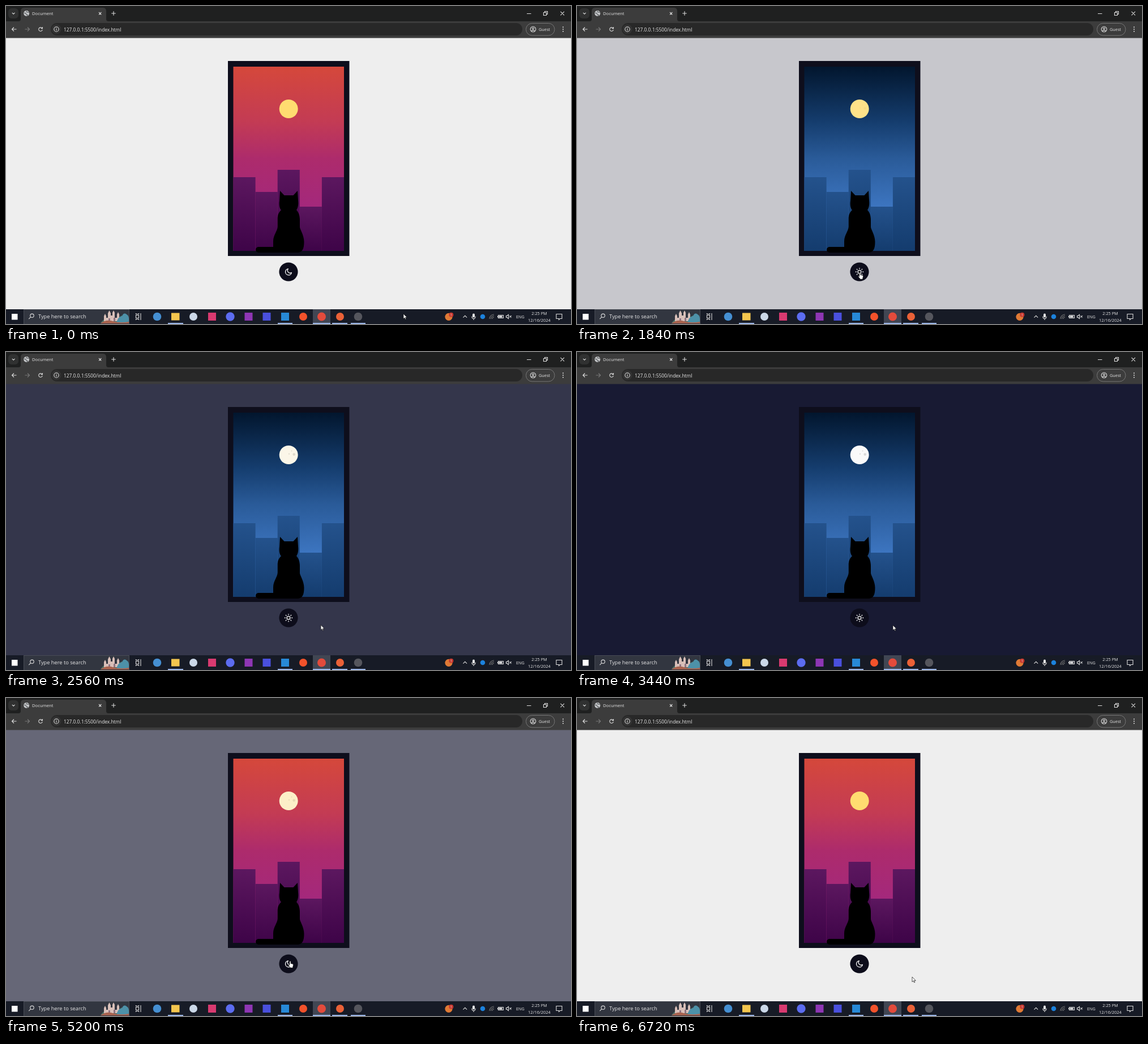
Animation of 998 by 561 pixels, one loop 6.8 s. Source, as an HTML page:

```html
<!DOCTYPE html>
<html lang="en">
<head>
<meta charset="utf-8">
<title>Day and night window</title>
<style>
  html, body { margin: 0; width: 100%; height: 100%; overflow: hidden; background: #eee; }
  svg { display: block; width: 100%; height: 100%; }
  text { font-family: "Open Sans", "Noto Sans", sans-serif; fill: #e6e6e6; }
  .line { fill: none; stroke: #dcdcdc; stroke-width: 1.1; }
  .dim { stroke: #777; }

  /* Colours fade after each click; the sky and icons switch at once. */
  .page, .disc, .crater { animation: 6.8s ease infinite; }
  .page { animation-name: page; }
  .disc { animation-name: disc; }
  .crater { animation-name: crater; }
  @keyframes page {
    0%, 23.38% { fill: #eee; }
    48.09%, 70.81% { fill: #181a33; }
    95.51%, 100% { fill: #eee; }
  }
  @keyframes disc {
    0%, 23.38% { fill: #ffdc70; }
    48.09%, 70.81% { fill: #fafafa; }
    95.51%, 100% { fill: #ffdc70; }
  }
  @keyframes crater {
    0%, 23.38% { fill: #ffdc70; }
    48.09%, 70.81% { fill: #d9d9d9; }
    95.51%, 100% { fill: #ffdc70; }
  }

  .day, .night, .arrow, .hand { animation: 6.8s step-end infinite; }
  .day { animation-name: day; }
  .night { animation-name: night; }
  .arrow { animation-name: arrow; }
  .hand { animation-name: hand; }
  @keyframes day { 0%, 70.81% { opacity: 1; } 23.38% { opacity: 0; } }
  @keyframes night { 0%, 70.81% { opacity: 0; } 23.38% { opacity: 1; } }
  @keyframes arrow { 0%, 32.5%, 80.1% { opacity: 1; } 12.9%, 58.5% { opacity: 0; } }
  @keyframes hand { 0%, 32.5%, 80.1% { opacity: 0; } 12.9%, 58.5% { opacity: 1; } }

  .cursor { animation: travel 6.8s ease-out infinite; }
  @keyframes travel {
    0%, 1.2% { transform: translate(702px, 543px); }
    10.6% { transform: translate(550px, 491px); }
    16.5%, 30.6% { transform: translate(500px, 470px); }
    31.76% { transform: translate(511px, 471px); }
    38.8%, 52.9% { transform: translate(558px, 482px); }
    63.2%, 77.6% { transform: translate(502px, 464px); }
    88.2%, 100% { transform: translate(592px, 492px); }
  }
</style>
</head>
<body>
<svg viewBox="0 0 998 561" preserveAspectRatio="none">
  <defs>
    <linearGradient id="daySky" x2="0" y2="1">
      <stop stop-color="#d5483b"/><stop offset=".3" stop-color="#c33b54"/>
      <stop offset=".5" stop-color="#ad2b6c"/><stop offset=".78" stop-color="#a3287d"/>
    </linearGradient>
    <linearGradient id="nightSky" x2="0" y2="1">
      <stop stop-color="#02162e"/><stop offset=".3" stop-color="#153d6e"/>
      <stop offset=".5" stop-color="#2a5b99"/><stop offset=".78" stop-color="#3e77c3"/>
    </linearGradient>
    <linearGradient id="dayTower" x2="0" y2="1">
      <stop stop-color="#5c175f"/><stop offset="1" stop-color="#3e0448"/>
    </linearGradient>
    <linearGradient id="nightTower" x2="0" y2="1">
      <stop stop-color="#24528c"/><stop offset="1" stop-color="#143c6e"/>
    </linearGradient>
    <rect id="sky" x="401.5" y="107" width="195.5" height="325"/>
    <g id="towers">
      <rect x="401.5" y="302" width="39.1" height="130"/>
      <rect x="440.6" y="328" width="39.1" height="104"/>
      <rect x="479.7" y="289" width="39.1" height="143"/>
      <rect x="518.8" y="354" width="39.1" height="78"/>
      <rect x="557.9" y="302" width="39.1" height="130"/>
    </g>
  </defs>

  <rect class="page" y="56" width="998" height="480" fill="#eee"/>

  <!-- Browser bars -->
  <rect width="998" height="28" fill="#1f2020"/>
  <rect y="27" width="998" height="29.5" fill="#3c3c3c"/>
  <path d="M22 27q4 0 4-4V9q0-6 6-6H171q6 0 6 6v14q0 4 4 4z" fill="#3c3c3c"/>
  <rect x="4" y="4" width="18" height="18" rx="6" fill="#303131"/>
  <path class="line" d="M10.8 11.8l2.4 2.4 2.4-2.4"/>
  <circle cx="36.2" cy="13" r="5" fill="#c4c6c8"/>
  <path d="M32 12.5q3-.5 3.500 1.500t2 1.500-.5 2.200M36 8.500q-.5 2 1.500 2.200t3 1" fill="none" stroke="#55585b" stroke-width="1.200"/>
  <text x="46" y="16" font-size="7.7">Document</text>
  <path class="line" d="M164 11l4.400 4.400M168.400 11l-4.400 4.400M186.200 13h7.600M190 9.200v7.600"/>
  <path class="line" d="M920 13.500h7.500M949.500 11.500h5v5h-5zM951.500 11.500v-2h5v5h-2M979.500 9.800l6.500 6.500M986 9.800l-6.500 6.500"/>
  <path class="line" d="M18.500 41h-8M14 37.500L10.500 41l3.500 3.500"/>
  <path class="line dim" d="M33.500 41h8M38 37.500l3.500 3.500-3.500 3.500"/>
  <path class="line" d="M63.800 39.300a3.300 3.300 0 1 0 .5 2.500M64.400 37v2.700h-2.700"/>
  <rect x="79" y="30" width="833" height="22" rx="11" fill="#282828"/>
  <circle cx="89" cy="41" r="8.500" fill="#333"/>
  <circle class="line" cx="89" cy="41" r="4.200"/>
  <path class="line" d="M89 40.300v3M89 38.500v1"/>
  <text x="102" y="44.500" font-size="8.400">127.0.0.1:5500/index.html</text>
  <rect x="918.500" y="30.500" width="50.500" height="21.500" rx="10.700" fill="none" stroke="#777"/>
  <circle class="line" cx="931" cy="41" r="4.800"/>
  <circle class="line" cx="931" cy="39.700" r="1.500"/>
  <path class="line" d="M927.800 44.200q3.200-2.600 6.400 0"/>
  <text x="941" y="43.800" font-size="7.300">Guest</text>
  <g fill="#dcdcdc">
    <circle cx="984" cy="37.300" r="1"/><circle cx="984" cy="41" r="1"/><circle cx="984" cy="44.700" r="1"/>
  </g>

  <!-- Window picture -->
  <rect x="392" y="97" width="214.500" height="344" fill="#0e0e1c"/>
  <g class="day">
    <use href="#sky" fill="url(#daySky)"/>
    <use href="#towers" fill="url(#dayTower)"/>
  </g>
  <g class="night" opacity="0">
    <use href="#sky" fill="url(#nightSky)"/>
    <use href="#towers" fill="url(#nightTower)"/>
  </g>
  <circle class="disc" cx="499.200" cy="181.500" r="16.500"/>
  <g class="crater">
    <circle cx="508.700" cy="180.600" r="2.300"/>
    <circle cx="500" cy="179.800" r="1.100"/>
    <circle cx="504.500" cy="174.500" r=".9"/>
  </g>
  <path d="M484 326L491.500 334H507.500L515 326L516 343C517 352 515 357 513 360C517 364 519 370 519 378V390C519 394 526.500 404 526.500 416C526.500 428 524 435 514 435H446a5 5 0 0 1 0-10H472V415C472 404 479.700 397 479.700 389V376C479.700 368 482 364 486 360C483 357 482 350 483 344Z"/>

  <!-- Theme button -->
  <circle cx="499" cy="469" r="16.600" fill="#0d0d1b"/>
  <path class="day" d="M498.400 463.700A5.500 5.500 0 1 0 504.400 470.300A4.500 4.500 0 0 1 498.400 463.700Z" fill="none" stroke="#fff" stroke-width="1.300" stroke-linejoin="round"/>
  <g class="night" opacity="0" fill="none" stroke="#fff" stroke-width="1.300" stroke-linecap="round">
    <circle cx="499" cy="469" r="2.900"/>
    <path d="M499 462.300v1M499 474.700v1M492.300 469h1M504.700 469h1M494.300 464.300l.7.700M503 473l.7.700M494.300 473.700l.7-.7M503 465l.7-.7"/>
  </g>

  <!-- Taskbar -->
  <rect y="535" width="998" height="26" fill="#171b26"/>
  <rect x="10" y="543" width="10.500" height="10.500" fill="#fff"/>
  <rect x="31.500" y="535.500" width="186" height="26" fill="#323640" stroke="#484c55"/>
  <circle class="line" cx="46" cy="546.300" r="3.200"/>
  <path class="line" d="M43.700 548.700l-3.500 3.500"/>
  <text x="57" y="551.300" font-size="9.250">Type here to search</text>

  <!-- Search box picture -->
  <path d="M167 560q6-11 15-7t18-4 17 4v7z" fill="#4f7468"/>
  <path d="M173 556v-9l2-4 2 4v3h3v-8l2.500-5 2.500 5v4h3v-5l2-4 2 4v9h4v-6l2-4 2 4v12z" fill="#d8bfb8"/>
  <path d="M181 556v-5h3v5zM190 556v-6h3v6z" fill="#8f7482"/>
  <path d="M195 560q2-12 10-13 3-7 8-3 4 2 4 8v8z" fill="#4d91a8"/>
  <path d="M167 560q10-8 22-4t28 1v3z" fill="#a9634f"/>

  <path class="line" d="M229.500 545.500h5v5h-5zM229.500 542v1.500h5V542M229.500 554v-1.500h5V554M238 542v12"/>
  <rect x="542" y="535" width="31" height="26" fill="#414653"/>
  <circle cx="267" cy="548" r="7.300" fill="#458fd2"/>
  <rect x="292" y="541.500" width="14.500" height="13" fill="#f4c64e"/>
  <circle cx="331" cy="548" r="7" fill="#cbd8e8"/>
  <rect x="357" y="541" width="14" height="14" fill="#d83a70"/>
  <circle cx="396" cy="548" r="7.700" fill="#5c6cf0"/>
  <rect x="421.500" y="541" width="14" height="14" fill="#8e36b4"/>
  <rect x="453.500" y="541" width="14" height="14" fill="#4a50dd"/>
  <rect x="486" y="541" width="14" height="14" fill="#2789d6"/>
  <circle cx="525" cy="548" r="7" fill="#f2522b"/>
  <circle cx="557.500" cy="548" r="7.500" fill="#e34b3c"/>
  <circle cx="590" cy="548" r="7" fill="#ea6137"/>
  <circle cx="622" cy="548" r="7.300" fill="#55565d"/>
  <path d="M286 560h27M480 560h26M542 560h31M576 560h27M609 560h26" stroke="#9db8ea" stroke-width="2"/>

  <!-- Tray -->
  <circle cx="782" cy="548.300" r="6.600" fill="#e07a35"/>
  <circle cx="786.300" cy="544.800" r="4" fill="#c93a32"/>
  <text x="784.800" y="547" font-size="6">1</text>
  <path class="line" d="M807.500 549.700l3.300-3.400 3.300 3.400"/>
  <rect x="824" y="542.500" width="4" height="7" rx="2" fill="#eee"/>
  <path class="line" d="M822.800 547.500q0 4 3.200 4t3.200-4M826 551.500v2.500"/>
  <circle cx="842" cy="548" r="4.300" fill="#1c82dd"/>
  <path class="line dim" d="M854 552a8 8 0 0 1 8-8M856.500 552a5.500 5.500 0 0 1 5.500-5.500M859 552a3 3 0 0 1 3-3"/>
  <path class="line" d="M869.500 545.500h9v5h-9z"/>
  <path d="M870.500 546.500h6v3h-6zM868 547h1.500v2H868z" fill="#eee"/>
  <path class="line" d="M883.500 546.500h1.700l2.300-2v7l-2.300-2h-1.700zM889.500 546.300l3.400 3.400M892.900 546.300l-3.400 3.400"/>
  <text x="901" y="550.800" font-size="7.200">ENG</text>
  <text x="942" y="544.800" font-size="7.300" text-anchor="middle">2:25 PM</text>
  <text x="942" y="556.600" font-size="7.500" text-anchor="middle">12/16/2024</text>
  <path class="line" d="M972 543.500h10v8h-3.500l-2 2v-2H972z"/>

  <g class="cursor" stroke="#111" stroke-width=".7" fill="#fff" stroke-linejoin="round">
    <path class="arrow" d="M0 0V8.800L2.100 6.900 3.500 10 4.900 9.400 3.500 6.500H6.300Z"/>
    <path class="hand" opacity="0" d="M-1.100 1.200a1.100 1.100 0 0 1 2.200 0V4.400L4.200 5.100Q5.700 5.500 5.500 7L4.700 10.500V12H-.3V10.800L-3 7.800Q-3.500 6.400-2.200 6.400L-1.100 7.300Z"/>
  </g>
</svg>
</body>
</html>
```
